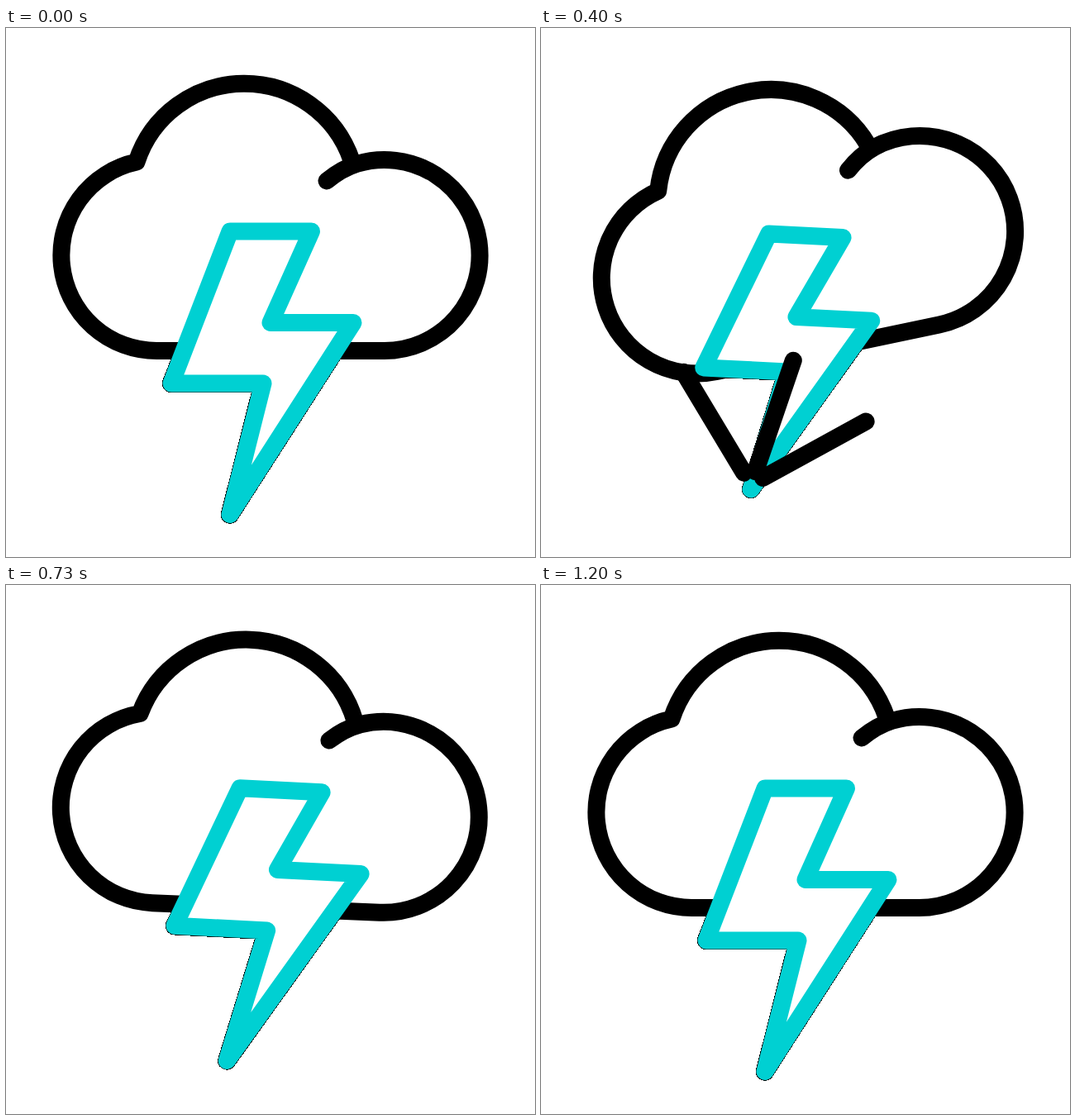
An HTML page for the animation above (1670 ms loop, 640 by 640 pixels).

```html
<!DOCTYPE html>
<html>
<head>
<meta charset="utf-8">
<style>
  html, body { margin: 0; height: 100%; overflow: hidden; background: #fff; }
  svg { display: block; width: 100%; height: 100%; }
  path { fill: #fff; stroke: #000; stroke-width: 21; stroke-linecap: round; stroke-linejoin: round; }
  #edge { stroke-width: 22.4; shape-rendering: crispEdges; }
  #bolt { stroke: #00d0d2; }
</style>
</head>
<body>
<svg viewBox="0 0 640 640">
  <path id="edge"/>
  <path id="cloud" d="M418 160A137 137 0 0 0 158 162.1A115.5 115.5 0 0 0 182.5 390.5H457.5A115.5 115.5 0 1 0 425 164.2Q406 170 388 185"/>
  <path id="bolt"/>
  <path id="rays"/>
</svg>
<script>
const LOOP = 1670, STEPS_PER_MS = 0.03, LAST_STEP = 36, RAY_LENGTH = 340;
const $ = id => document.getElementById(id);

// Bolt corners relative to its top left one; the lower part slides against the top edge
const topEdge = [[0, 0], [98.5, 0]];
const lowerPart = [[49, 110.5], [149, 110.5], [0, 342.5], [40, 184], [-71, 184]];
const rest = { x: 271, tilt: 0, scale: 1, lean: 0, stretch: 0 };
const boltKeys = [
  { at: 0, ...rest },
  { at: 8, x: 274, tilt: 13.9, scale: 0.981, lean: 11.6, stretch: -42.3 },
  { at: 15.5, x: 277, tilt: -6.2, scale: 0.85, lean: -22, stretch: 31.4 },
  { at: 22, x: 283, tilt: 2.9, scale: 1.008, lean: 1, stretch: -15 },
  { at: 26, ...rest }
];

// Each swing of the cloud is half as wide as the one before
const swings = [0, 1, 2, 3].map(k => ({ at: 13.2 + 6 * k, tilt: -14.8 * (-0.5) ** k }));
const cloudKeys = [{ at: 9, tilt: 0 }, ...swings, { at: 36, tilt: 0 }];

const clamp = (value, max) => Math.max(0, Math.min(max, value));

function pose(keys, step) {
  const next = Math.max(1, keys.findIndex(key => key.at > step));
  const [a, b] = step < keys.at(-1).at ? [keys[next - 1], keys[next]] : keys.slice(-2);
  const t = clamp((step - a.at) / (b.at - a.at), 1);
  const mix = t * t * (3 - 2 * t);
  return Object.fromEntries(Object.keys(a).map(name => [name, a[name] + (b[name] - a[name]) * mix]));
}

function boltCorners({ x, tilt, scale, lean, stretch }) {
  const angle = tilt * Math.PI / 180;
  const cos = scale * Math.cos(angle), sin = scale * Math.sin(angle);
  const y = 246 + 33 * (1 - scale);
  const slid = lowerPart.map(([px, py]) => [px + lean, py + stretch]);
  return [...topEdge, ...slid].map(([px, py]) => [x + px * cos - py * sin, y + px * sin + py * cos]);
}

function rayPath(step, [x, y], tilt) {
  const outer = clamp(44.7 * (step - 8.45), RAY_LENGTH);
  const inner = clamp(33.2 * (step - 11.5), RAY_LENGTH);
  if (inner >= outer) return '';
  return [-33.8, 16, 58.4].map(direction => {
    const angle = (direction + tilt) * Math.PI / 180;
    const at = r => `${x + r * Math.sin(angle)} ${y - r * Math.cos(angle)}`;
    return `M${at(inner)}L${at(outer)}`;
  }).join('');
}

function draw(time) {
  const step = Math.min(LAST_STEP, Math.floor((time % LOOP + 4) * STEPS_PER_MS));
  const bolt = pose(boltKeys, step);
  const corners = boltCorners(bolt);
  const outline = `M${corners.join(' ')}Z`;
  const [tipX, tipY] = corners[4];
  $('edge').setAttribute('d', outline);
  $('bolt').setAttribute('d', outline);
  $('cloud').setAttribute('transform', `rotate(${pose(cloudKeys, step).tilt} 318 258)`);
  $('rays').setAttribute('d', rayPath(step, [tipX, tipY - 62 * (1 - bolt.scale)], bolt.tilt));
}

const start = performance.now();
function tick() {
  draw(performance.now() - start);
  requestAnimationFrame(tick);
}
tick();
</script>
</body>
</html>
```
